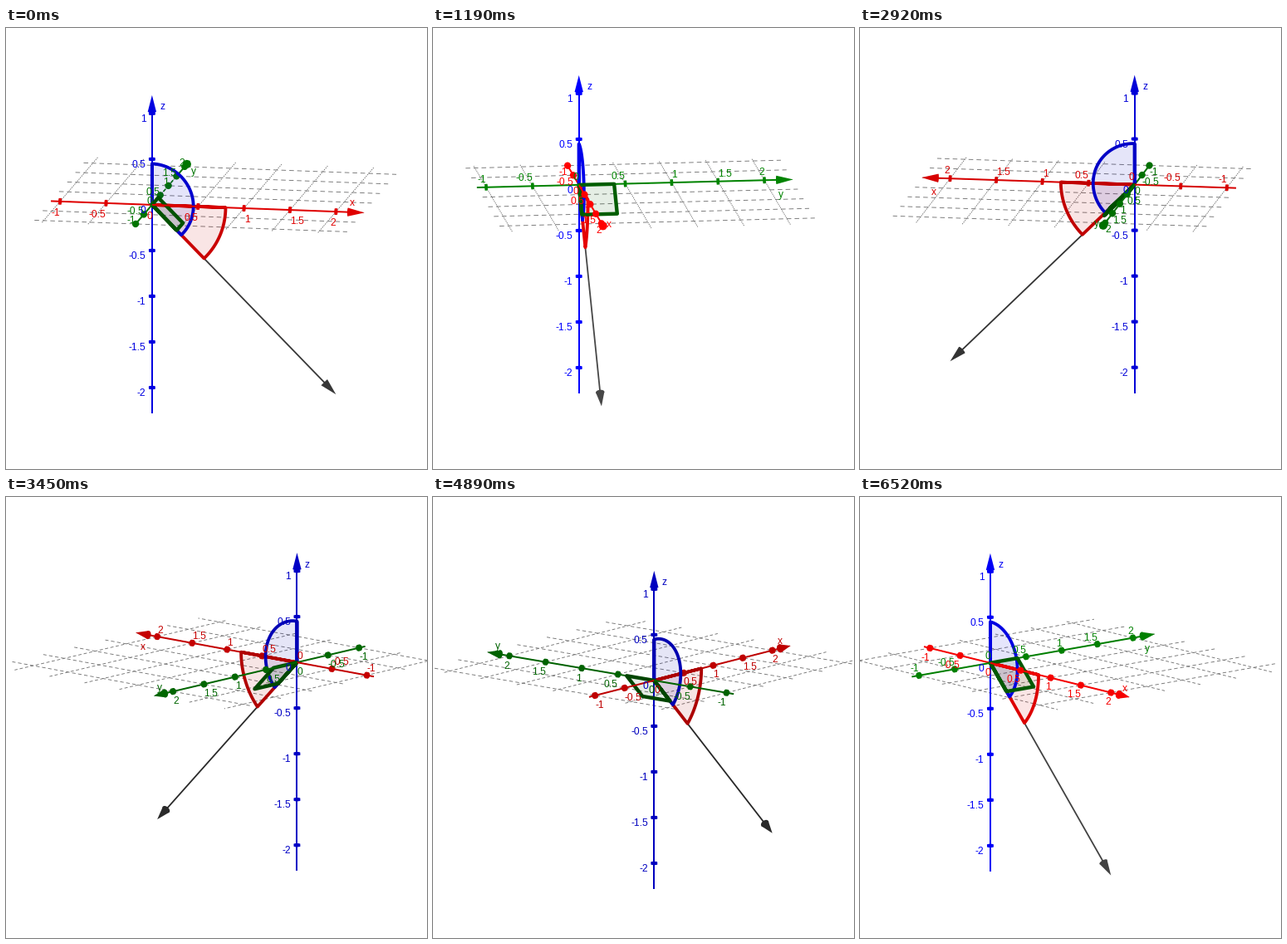
Recreate the animation shown at these times as a matplotlib script. Size 507 by 531 pixels, loop 6600 ms.

```python
import numpy as np
import matplotlib.pyplot as plt
from matplotlib.animation import FuncAnimation

W, H, DPI = 507, 531, 64
PX = 72 / DPI                      # one pixel in points
LOOP, TICK = 6600, 25              # ms

SCALE = 112.5                      # pixels per unit
TILT = np.radians(12)
CENTRE = np.array([253.3, 200.4])  # screen point the scene turns about
OFFSET = np.array([-0.592, -0.627, 0])
START, SPEED = 10.1, 0.0613        # degrees, degrees per ms

RED, GREEN, BLUE = np.eye(3) * [1, 0.52, 1]
X, Y, Z = np.eye(3)
VECTOR = np.array([2, 0, -2])
V_UNIT = VECTOR / np.linalg.norm(VECTOR)
LOW, TIP, HEAD = -1.1, 2.31, 0.18

# The view turns in held steps, slightly uneven in time.
firsts = [90, 810, 1560, 2280, 3000, 3720, 4440, 5150, 5880]
lasts = [720, 1470, 2200, 2920, 3630, 4350, 5060, 5790, 6520]
knots = [0] + [n for g in range(9) for n in (8 * g + 1, 8 * g + 8)]
times = [0] + [t for pair in zip(firsts, lasts) for t in pair]
STARTS = np.round(np.interp(range(73), knots, times), -1)

plt.rcParams["font.family"] = "Liberation Sans"
fig = plt.figure(figsize=(W / DPI, H / DPI), dpi=DPI, facecolor="white")
ax = fig.add_axes([0, 0, 1, 1])
ax.set_xlim(-0.5, W - 0.5)
ax.set_ylim(H - 0.5, -0.5)
ax.axis("off")


class View:
    """Orthographic view turned by an angle about the vertical."""

    def __init__(self, angle):
        self.cos, self.sin = np.cos(angle), np.sin(angle)
        self.shade = 0.86 + 0.14 * np.cos(angle - np.radians(92))

    def flat(self, p):
        """Screen displacement, in units, of a direction."""
        x, y, z = np.moveaxis(np.asarray(p, float), -1, 0)
        right = self.cos * x + self.sin * y
        down = np.sin(TILT) * (self.sin * x - self.cos * y) - np.cos(TILT) * z
        return np.stack([right, down], -1)

    def point(self, p):
        return CENTRE + SCALE * self.flat(np.asarray(p) + OFFSET)

    def toward(self, p):
        """How far a direction points at the viewer."""
        x, y, z = p
        return np.cos(TILT) * (self.sin * x - self.cos * y) + np.sin(TILT) * z


def line(pts, color, width, z, dash=None):
    style = (0, tuple(d / width for d in dash)) if dash else "-"
    ax.plot(*np.transpose(pts), color=color, lw=width * PX, ls=style, zorder=z,
            solid_capstyle="butt", dash_capstyle="butt",
            solid_joinstyle="round")


def fill(pts, color, z, alpha=1):
    ax.fill(*np.transpose(pts), facecolor=color, lw=0, zorder=z, alpha=alpha)


def label(pos, text, color, ha="center"):
    ax.text(*pos, text, color=color, fontsize=12 * PX, ha=ha,
            va="center_baseline", zorder=9)


def disc(view, p, axis, r, thick, color, z):
    """A short cylinder around an axis, seen from the viewer's side."""
    along = view.flat(axis)
    size = max(np.hypot(*along), 1e-6)
    along = along / size
    across = np.array([-along[1], along[0]])
    a = np.linspace(0, 2 * np.pi, 25)[:, None] + 0.01
    reach = np.sign(np.cos(a)) * thick * size
    reach = reach + r * abs(view.toward(axis)) * np.cos(a)
    fill(view.point(p) + reach * along + r * np.sin(a) * across, color, z)
    return across


def cone(view, tip, axis, r, color, z):
    base = tip - HEAD * axis
    across = disc(view, base, axis, r, 0, color, z)
    foot = view.point(base)
    fill([view.point(tip), foot + r * across, foot - r * across], color, z)


def draw_grid(view):
    for axis, other in ((X, Y), (Y, X)):
        size = SCALE * np.hypot(*view.flat(axis))
        dash = (0.05 * size, 0.036 * size)
        for v in np.arange(-1, 2.1, 0.5):
            ends = view.point([LOW * axis + v * other, 2.3 * axis + v * other])
            line(ends, "0.45", 0.9, 0, dash)


def hidden_reach(view):
    """Which part of the y axis lies behind the upper sector."""
    side = np.sign(view.cos)
    if side * view.sin / view.cos <= 0:
        return 0
    rho = np.hypot(view.sin, np.tan(TILT)) / abs(view.cos)
    return side * min(0.45 / rho, 2)


def draw_axis(view, axis, color, low, tip, ticks, hidden=0):
    def order(v):
        if axis is Z:
            return 2
        return 6 if view.toward(v * axis) > 0 else 1

    for end in (low, tip - HEAD / 2):
        begin = hidden if hidden * end > 0 else 0
        line(view.point([begin * axis, end * axis]), color, 2, order(end))
        if begin:
            line(view.point([0 * axis, begin * axis]), color, 1.6,
                 order(end), (4, 3))
    for v in ticks:
        if v:
            disc(view, v * axis, axis, 4, 1.4, color, order(v))
    cone(view, tip * axis, axis, 5.1, color, order(tip))


def flat_labels(view, axis, away, name, color):
    """Numbers beside an axis; the name goes on the other side."""
    dx, dy = view.flat(away)
    lift = np.sign(dy) * (5 + 0.28 * SCALE * abs(dy)) + 1
    for v in np.arange(-1, 2.1, 0.5):
        if abs(dx) > 0.6:
            left = dx > 0
        else:
            left = v in (1, 1.5)
        pos = view.point(v * axis) + [0, lift]
        label(pos, f"{v:g}", color, "left" if left else "right")
    drop = 2 - np.sign(dy) * (5 + 0.4 * SCALE * abs(dy))
    label(view.point(2.18 * axis) + [-7 * dx ** 3, drop], name, color)


def draw_sector(view, radius, first, last, color, z):
    a = np.radians(np.linspace(first, last, 40))[:, None]
    arc = radius * (np.cos(a) * X + np.sin(a) * Z)
    pts = view.point(np.vstack([0 * X, arc, 0 * X, arc[:1]]))
    fill(pts, color, 3, 0.1)
    line(pts, color, 3.8, z)


def draw_square(view, color):
    u, v = 0.38 * V_UNIT, 0.38 * Y
    pts = view.point([0 * u, u, u + v, v, 0 * u, u])
    fill(pts, color, 3, 0.1)
    line(pts, color, 4.4, 5)


def draw(i):
    for artist in [*ax.lines, *ax.patches, *ax.texts]:
        artist.remove()
    step = np.searchsorted(STARTS, i * TICK + 20, side="right") - 1
    view = View(np.radians(START + SPEED * STARTS[step]))
    red, green, blue = (view.shade * c for c in (RED, GREEN, BLUE))
    grey = str(0.28 * view.shade ** 2)

    draw_grid(view)
    flat_ticks = np.arange(-1, 2.1, 0.5)
    z_ticks = np.arange(-2, 1.1, 0.5)
    draw_axis(view, X, red, LOW, TIP, flat_ticks)
    draw_axis(view, Y, green, LOW, TIP, flat_ticks, hidden_reach(view))
    draw_axis(view, Z, blue, -2.28, 1.2, z_ticks)

    line(view.point([0 * X, VECTOR - 0.1 * V_UNIT]), grey, 1.8, 3)
    cone(view, VECTOR, V_UNIT, 5.2, grey, 3)
    draw_sector(view, 0.8, 0, -45, 0.9 * red, 4)
    draw_sector(view, 0.45, 90, -45, 0.92 * blue, 4.5)
    draw_square(view, 0.7 * green)

    flat_labels(view, X, -Y, "x", red)
    flat_labels(view, Y, -X, "y", green)
    for v in z_ticks:
        label(view.point(v * Z) + [-7.5, 5.5], f"{v:g}", blue, "right")
    label(view.point(1.2 * Z) + [12.5, 13], "z", blue)
    return []


anim = FuncAnimation(fig, draw, frames=LOOP // TICK, interval=TICK,
                     init_func=lambda: [], repeat=True, repeat_delay=0)
plt.show()
```
